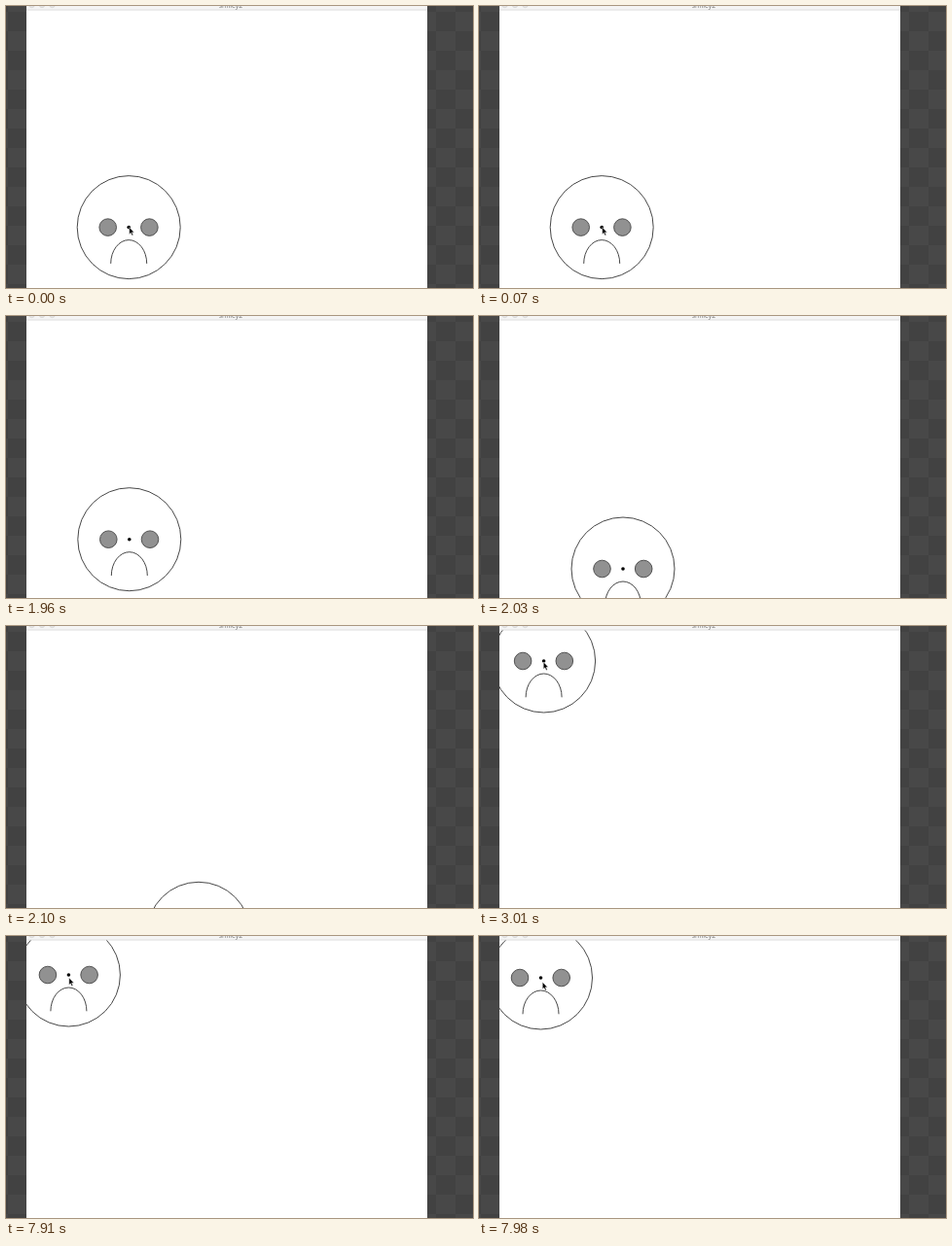
Animation of 480x290 px, one loop 8000 ms. Source, as an HTML page:

```html
<!DOCTYPE html>
<html lang="en">
<head>
<meta charset="utf-8">
<style>
  html, body { margin: 0; width: 100%; height: 100%; overflow: hidden; background: #434343; }
  svg { display: block; width: 480px; height: 290px; }
  .title { font: 7px "Open Sans", "Noto Sans", sans-serif; fill: #777; text-anchor: middle; }
  .outline { fill: none; stroke: #333; stroke-width: .9; }
  .eye { fill: #919191; stroke: #444; stroke-width: .9; }
</style>
</head>
<body>
<svg viewBox="0 0 480 290">
  <defs>
    <pattern id="checks" x="2" y="6" width="40" height="40" patternUnits="userSpaceOnUse">
      <path fill="#424242" d="M0 0h40v40H0z"/>
      <path fill="#484848" d="M20 0h20v20H20zM0 20h20v20H0z"/>
    </pattern>
    <clipPath id="page"><path d="M21 4.5h412V290H21z"/></clipPath>
  </defs>
  <path fill="url(#checks)" d="M0 0h480v290H0z"/>
  <path fill="#fff" d="M21 0h412v290H21z"/>
  <path fill="#f5f5f5" d="M21 0h412v3.5H21z"/>
  <path fill="#dcdcdc" d="M21 3.5h412v1H21z"/>
  <g fill="#e4e4e4" stroke="#cfcfcf" stroke-width=".6">
    <circle cx="26.5" cy="-1" r="2.7"/>
    <circle cx="37" cy="-1" r="2.7"/>
    <circle cx="47.5" cy="-1" r="2.7"/>
  </g>
  <text class="title" x="231" y="1.6">smiley2</text>
  <g clip-path="url(#page)">
    <g id="face">
      <circle class="outline" r="53"/>
      <circle class="eye" cx="-21.5" r="8.8"/>
      <circle class="eye" cx="21.2" r="8.8"/>
      <circle r="1.8"/>
      <path class="outline" d="M-18.5 37.3A18.5 24.3 0 0 1 18.5 37.3"/>
    </g>
  </g>
  <path id="cursor" stroke="#fff" stroke-width=".4" d="M0 0V7.2L1.6 5.8L2.8 8.5L4 8L2.8 5.3H5z"/>
</svg>
<script>
  const LOOP = 8000;
  // The face follows the mouse in hard steps; the cursor hides while dragging fast.
  const poses = [
    { at: 0, face: [126.2, 227.6], cursor: [126.7, 227.5] },
    { at: 1960, face: [126.8, 229.7] },
    { at: 2030, face: [148, 260] },
    { at: 2100, face: [198, 316.3] },
    { at: 3010, face: [66.6, 36], cursor: [66.3, 37] },
    { at: 7840, face: [65, 37.6], cursor: [64.6, 39.3] },
    { at: 7910, face: [64.4, 40], cursor: [64.8, 43] },
    { at: 7980, face: [63.5, 43], cursor: [65.3, 47.4] }
  ];
  const face = document.getElementById("face");
  const cursor = document.getElementById("cursor");
  const place = (node, point) => node.setAttribute("transform", `translate(${point})`);

  function draw() {
    const time = performance.now() % LOOP;
    const pose = poses.findLast(({ at }) => at <= time);
    place(face, pose.face);
    cursor.style.display = pose.cursor ? "" : "none";
    if (pose.cursor) place(cursor, pose.cursor);
    requestAnimationFrame(draw);
  }
  draw();
</script>
</body>
</html>
```
